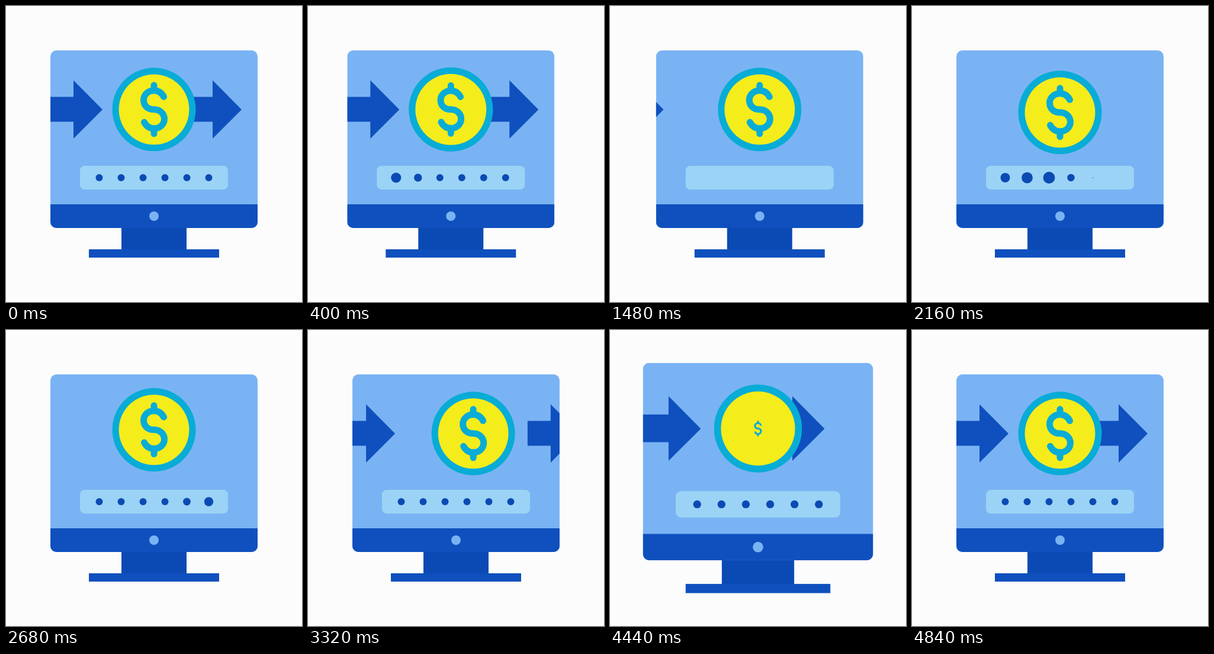
An HTML page that plays this animation: 500 px wide and 500 px high, repeating every 5000 ms.

```html
<!DOCTYPE html>
<html lang="en">
<head>
<meta charset="utf-8">
<title>Online payment</title>
<style>
  html, body { margin: 0; width: 100%; height: 100%; overflow: hidden; background: #fcfcfc; }
  svg { display: block; width: 100%; height: 100%; }
  .dark { fill: #0f50be; }
  .deep { fill: #0b4ab4; }
  .light { fill: #7ab3f3; }
</style>
</head>
<body>
<svg viewBox="0 0 500 500">
  <defs>
    <clipPath id="screen"><rect x="75" y="75" width="350" height="300" rx="10"/></clipPath>
    <path id="arrow" d="M-88 -21.5H-49V-49.5L0 0L-49 49V20.5H-88Z"/>
  </defs>
  <g id="monitor">
    <rect class="deep" x="195" y="370" width="110" height="42"/>
    <rect class="dark" x="140" y="411" width="220" height="14"/>
    <g clip-path="url(#screen)">
      <rect class="light" x="75" y="75" width="350" height="300"/>
      <rect class="dark" x="75" y="335" width="350" height="40"/>
      <use id="left" class="dark" href="#arrow"/>
      <use id="right" class="dark" href="#arrow"/>
    </g>
    <circle class="light" cx="250" cy="355" r="8"/>
    <rect x="125" y="270" width="250" height="40" rx="8" fill="#9bd3f6"/>
    <g id="dots" class="deep"></g>
    <g id="coin">
      <g id="disc">
        <circle r="70.5" fill="#08acd6"/>
        <circle r="59.4" fill="#f5ec1c"/>
      </g>
      <path id="dollar" fill="none" stroke="#08acd6" stroke-width="11" stroke-linecap="round"
        d="M16.5 -21.5C13 -28 7 -32 0 -32C-10 -32 -17.5 -25 -17.5 -16C-17.5 -6 -10 0 0 0C10 0 17.5 7 17.5 16C17.5 25 10 32 0 32C-8 32 -13 28 -16.5 21.5M0 -41V-33M0 32V41"/>
    </g>
  </g>
</svg>
<script>
const TICK = 40, LOOP = 5000, DOT_COUNT = 6, DOT_DELAY = 2.5, SWAY = 14.2;
const $ = id => document.getElementById(id);

const smooth = u => u * u * (3 - 2 * u);
const steep = u => u ** 2.2 / (u ** 2.2 + (1 - u) ** 2.2);
const easeOut = u => 1 - (1 - u) ** 2.4;

// ramp: eased 0 to 1; hold: up, stay, down; bump: up and straight down.
const ramp = (t, from, to, ease = smooth) =>
  ease(Math.min(1, Math.max(0, (t - from) / (to - from))));
const hold = (t, a, b, c, d) => ramp(t, a, b) - ramp(t, c, d);
const bump = (t, from, peak, to) => hold(t, from, peak, peak, to);

function shake(t) {
  const swing = n => ramp(t, n * SWAY, (n + 1) * SWAY, steep);
  return 10 * (2 * swing(1) - swing(0) - swing(2));
}

function rightShift(t) {
  const thrown = t < 88 ? 234 * ramp(t, 75, 87.5) : 0;
  return thrown - 104 * hold(t, 17.3, 45, 103, 118);
}

const leftShift = t => -100 * hold(t, 12, 49, 75, 85.7);
const coinX = t => 30.5 * bump(t, 75, 82, 90);
const coinY = t =>
  5 * bump(t, 48.5, 54, 62) - 12 * bump(t, 43, 48.5, 54) - 15 * bump(t, 54, 62, 71);

function dotRadius(t) {
  const out = 4 * ramp(t, 6.75, 16, easeOut) - 10 * ramp(t, 16, 22.6);
  const back = 10 * ramp(t, 43, 49) - 4 * ramp(t, 49, 59);
  return Math.max(0, 6 + out + back);
}

const dots = Array.from({ length: DOT_COUNT }, (_, i) => {
  const dot = document.createElementNS('http://www.w3.org/2000/svg', 'circle');
  dot.setAttribute('cx', 157.5 + 37 * i);
  dot.setAttribute('cy', 290);
  return $('dots').appendChild(dot);
});

const place = (id, transform) => $(id).setAttribute('transform', transform);

function draw(time) {
  const t = Math.floor((time % LOOP) / TICK);
  const zoom = bump(t, 98.7, 106, 121);
  const swell = bump(t, 8, 20, 32);
  place('monitor', `translate(${250 + shake(t)} 250) scale(${1 + 0.15 * zoom}) translate(-250 -250)`);
  place('left', `translate(${163 + leftShift(t)} 175)`);
  place('right', `translate(${398 + rightShift(t)} 175)`);
  place('coin', `translate(${250 + coinX(t)} ${174.8 + coinY(t)})`);
  place('disc', `scale(${1 + 0.12 * swell - 0.07 * bump(t, 98, 106, 121)})`);
  place('dollar', `scale(${1 - 0.14 * swell - bump(t, 90, 106, 121)})`);
  dots.forEach((dot, i) => dot.setAttribute('r', dotRadius(t - DOT_DELAY * i)));
}

const start = performance.now();
function loop() {
  draw(performance.now() - start);
  requestAnimationFrame(loop);
}
loop();
</script>
</body>
</html>
```
